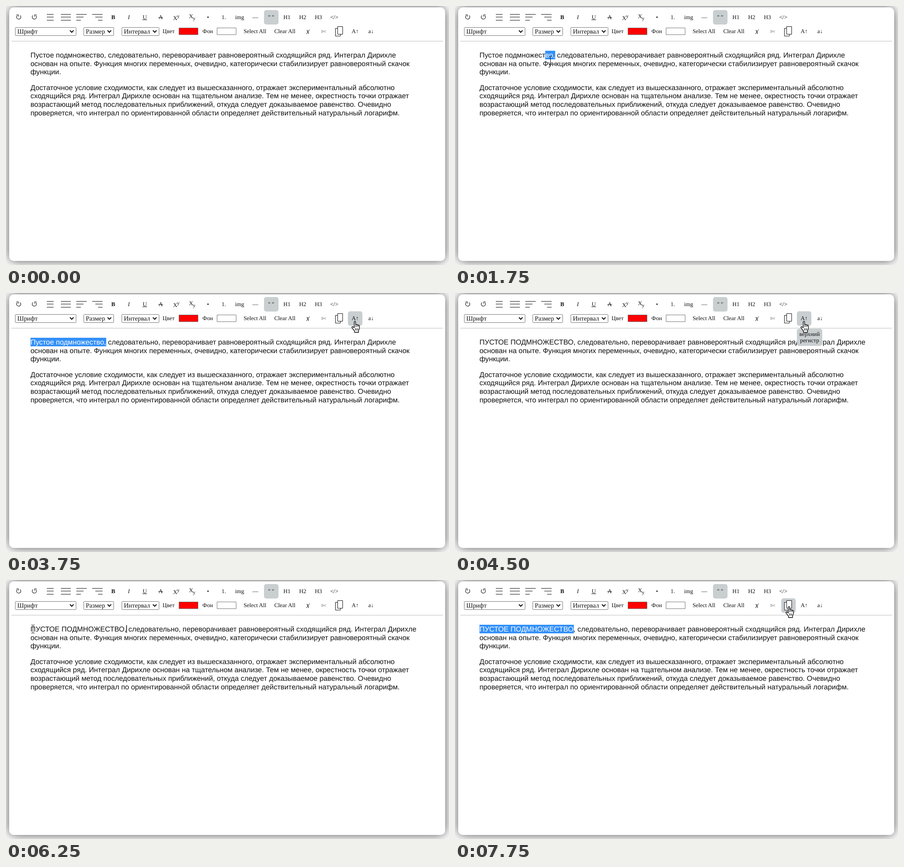
These frames come from a looping animation (977 by 573 pixels, 8 s). An HTML page with a canvas:

```html
<!DOCTYPE html>
<html lang="ru">
<head>
<meta charset="utf-8">
<style>
html, body { margin: 0; width: 100%; height: 100%; overflow: hidden; background: #fff; }
canvas { display: block; }
</style>
</head>
<body>
<canvas id="stage" width="977" height="573"></canvas>
<script>
const ctx = document.getElementById('stage').getContext('2d');
ctx.textRendering = 'geometricPrecision';
const LOOP = 8000, STEP = 250;
const INK = '#111', HOVER = '#c9ced1', BLUE = '#3390f8';
const SERIF = '"Liberation Serif", "DejaVu Sans", serif';
const BODY = '15.83px "Liberation Sans", sans-serif';
const LEFT = 54;

const HEAD = 'Пустое подмножество';
const LINES = [
  [', следовательно, переворачивает равновероятный сходящийся ряд. Интеграл Дирихле', 114],
  ['основан на опыте. Функция многих переменных, очевидно, категорически стабилизирует равновероятный скачок', 133],
  ['функции.', 151],
  ['Достаточное условие сходимости, как следует из вышесказанного, отражает экспериментальный абсолютно', 186],
  ['сходящийся ряд. Интеграл Дирихле основан на тщательном анализе. Тем не менее, окрестность точки отражает', 204],
  ['возрастающий метод последовательных приближений, откуда следует доказываемое равенство. Очевидно', 223],
  ['проверяется, что интеграл по ориентированной области определяет действительный натуральный логарифм.', 242]
];

// Pointer stops: time, shape, x, y
const POINTER = [
  [0, ''], [750, 'beam', 434, 246], [1000, 'beam', 208, 150], [1250, 'beam', 239, 105],
  [1750, 'beam', 210, 120], [2000, 'beam', 160, 126], [2250, 'beam', 100, 122],
  [2500, 'beam', 59, 116], [2750, 'beam', 149, 108], [3000, 'beam', 300, 106],
  [3250, 'beam', 520, 102], [3500, 'arrow', 715, 82], [3750, 'hand', 770, 62],
  [4750, 'hand', 769, 64], [5000, 'beam', 650, 100], [5250, 'beam', 500, 107],
  [5500, 'beam', 412, 112], [5750, 'beam', 250, 131], [6000, 'beam', 110, 118],
  [6250, 'beam', 59, 108], [6500, 'beam', 165, 108], [6750, 'beam', 266, 110],
  [7000, 'beam', 420, 102], [7250, 'arrow', 640, 80], [7500, 'hand', 730, 62],
  [7750, 'hand', 737, 58]
];

// Selected span in x: time, from, to
const SELECTION = [
  [0, 0, 0], [1750, 199, 221], [2000, 154, 221], [2250, 97, 221], [2500, 54, 221],
  [4000, 0, 0], [6500, 54, 163], [6750, 54, 262]
];

const at = (track, t) => track.filter(k => k[0] <= t).pop();

function text(s, x, y, font, color = INK, align = 'left') {
  ctx.font = font;
  ctx.fillStyle = color;
  ctx.textAlign = align;
  ctx.fillText(s, x, y);
}

const label = (s, x, y = 29, style = '', size = 12.8) =>
  text(s, x, y, `${style} ${size}px ${SERIF}`, INK, 'center');

function roundBox(x, y, w, h, r, color) {
  ctx.fillStyle = color;
  ctx.beginPath();
  ctx.roundRect(x, y, w, h, r);
  ctx.fill();
}

function frameBox(x, y, w, h, fill, stroke, r = 0) {
  ctx.beginPath();
  ctx.roundRect(x + .5, y + .5, w - 1, h - 1, r);
  ctx.fillStyle = fill;
  ctx.fill();
  ctx.strokeStyle = stroke;
  ctx.lineWidth = 1;
  ctx.stroke();
}

function rule(x1, x2, y, color = INK) {
  ctx.fillStyle = color;
  ctx.fillRect(x1, y, x2 - x1, 1);
}

function poly(points, close) {
  ctx.beginPath();
  points.forEach(([x, y]) => ctx.lineTo(x, y));
  if (close) ctx.closePath();
}

function line(points, width = 1) {
  poly(points);
  ctx.strokeStyle = INK;
  ctx.lineWidth = width;
  ctx.stroke();
}

function card() {
  ctx.fillStyle = '#fff';
  ctx.fillRect(0, 0, 977, 573);
  ctx.save();
  ctx.shadowColor = 'rgba(0,0,0,.68)';
  ctx.shadowBlur = 24;
  roundBox(7, 3, 961.5, 561, 10, '#fff');
  ctx.restore();
  rule(12, 964, 77.4, '#bcbcbc');
}

function select(s, x, w) {
  frameBox(x, 47, w, 19, '#fff', '#767676', 1);
  text(s, x + 5, 61, `14.3px ${SERIF}`);
  const cx = x + w - 10;
  line([[cx - 4, 54], [cx, 58.3], [cx + 4, 54]], 2);
}

function alignIcons() {
  [18, 24, 31].forEach((y, i) => {
    rule(90, 105, y);
    rule(121, 143, y);
    rule(155, [178, 171, 165][i], y);
    rule([190, 197, 203][i], 213, y);
  });
}

// Circular arrow; dir -1 mirrors it
function turn(x, dir) {
  ctx.save();
  ctx.translate(x, 24.5);
  ctx.scale(dir, 1);
  ctx.beginPath();
  ctx.arc(0, 0, 4.7, -.9, Math.PI * 1.25);
  ctx.strokeStyle = INK;
  ctx.lineWidth = 1.1;
  ctx.stroke();
  line([[-5, -5], [-.8, -5], [-.8, -1]], 1.1);
  ctx.restore();
}

function toolbar(hover) {
  roundBox(569, 9, 32, 32, 5, HOVER);
  if (hover) roundBox(hover, 40.5, 32, 32, 5, HOVER);

  turn(28, 1);
  turn(62.5, -1);
  alignIcons();
  label('B', 236.5, 29, 'bold');
  label('I', 271, 29, 'italic');
  label('U', 306);
  rule(301, 311, 30);
  label('A', 341);
  rule(336, 346, 25);
  label('X', 373, 31);
  label('y', 380, 26, '', 11);
  label('X', 408, 27);
  label('y', 415, 31, '', 11);
  ['•', '1.', 'img', '—', '" "', 'H1', 'H2', 'H3', '</>']
    .forEach((s, i) => label(s, 445.5 + i * 34.8));

  select('Шрифт', 20, 135);
  select('Размер', 171, 67);
  select('Интервал', 255, 83);
  label('Цвет', 358.5, 60);
  frameBox(381, 48, 43, 16, '#f00', '#767676');
  label('Фон', 445, 60);
  frameBox(465, 48, 43, 16, '#fff', '#767676');
  label('Select All', 549, 60);
  label('Clear All', 615, 60);
  line([[669.5, 52], [662.5, 62]]);
  line([[663, 54], [664.5, 54], [667.5, 61.5]], 1.2);
  text('✄', 700.5, 61, `13px ${SERIF}`, '#777', 'center');
  frameBox(726, 49, 12, 18, '#fff', INK);
  frameBox(731, 45, 12, 18, '#fff', INK);
  label('A↑', 770, 60);
  label('a↓', 805, 60);
}

function article(upper, from, to) {
  const first = (upper ? HEAD.toUpperCase() : HEAD) + LINES[0][0];
  LINES.forEach(([s, y], i) => text(i ? s : first, LEFT, y, BODY));
  if (to > from) {
    ctx.save();
    ctx.beginPath();
    ctx.rect(from, 99, to - from, 19);
    ctx.clip();
    ctx.fillStyle = BLUE;
    ctx.fillRect(from, 99, to - from, 19);
    text(first, LEFT, 114, BODY, '#fff');
    ctx.restore();
  }
}

function tooltip() {
  roundBox(754, 79, 56, 38, 5, HOVER);
  label('верхний', 782, 95);
  label('регистр', 782, 109);
}

function beam(x, y, color) {
  ctx.fillStyle = color;
  ctx.fillRect(x, y - 8, 1, 17);
  [-9, 9].forEach(d => {
    ctx.fillRect(x - 3, y + d, 3, 1);
    ctx.fillRect(x + 1, y + d, 3, 1);
  });
}

function outlined(x, y, points) {
  poly(points.map(([px, py]) => [x + px, y + py]), true);
  ctx.fillStyle = '#fff';
  ctx.strokeStyle = '#000';
  ctx.lineWidth = 1.3;
  ctx.lineJoin = 'round';
  ctx.fill();
  ctx.stroke();
}

function arrow(x, y) {
  outlined(x, y, [[0, 0], [0, 16], [4, 12.5], [6.5, 18], [9, 17], [6.5, 11.5], [11.5, 11.5]]);
}

function hand(x, y) {
  outlined(x, y, [[-2, 1.5], [-.5, .5], [1, 1.5], [1, 8], [2.5, 7.3], [4, 8.5], [5.5, 8], [7, 9.5],
    [8.5, 9], [9.5, 10.5], [9.5, 17], [7.5, 21], [7.5, 25], [-1.5, 25], [-1.5, 22], [-7, 15],
    [-7, 13], [-5, 12.5], [-2, 15]]);
  ctx.fillStyle = '#000';
  [1, 4, 7].forEach(d => ctx.fillRect(x + d - .5, y + 9, 1, 4));
  [0, 2.7, 5.4].forEach(d => ctx.fillRect(x + d, y + 16, 1, 5));
}

function draw(t) {
  const [, shape, x, y] = at(POINTER, t);
  const [, from, to] = at(SELECTION, t);
  const onCase = t >= 3750 && t < 5000;
  const onCopy = t >= 7500;

  card();
  toolbar(onCase ? 754 : onCopy ? 719.5 : 0);
  article(t >= 4000, from, to);
  if (t >= 4000 && t < 6500 && t % 1000 < 500) {
    ctx.fillStyle = INK;
    ctx.fillRect(265, 100, 1.5, 17);
  }
  if (t >= 4000 && onCase) tooltip();
  if (shape === 'beam') beam(x, y, x >= from && x < to && y < 118 ? '#fff' : INK);
  if (shape === 'arrow') arrow(x, y);
  if (shape === 'hand') hand(x, y);
}

const start = performance.now();
function tick() {
  const t = (performance.now() - start) % LOOP;
  draw(Math.floor(t / STEP) * STEP);
  requestAnimationFrame(tick);
}
tick();
</script>
</body>
</html>
```
